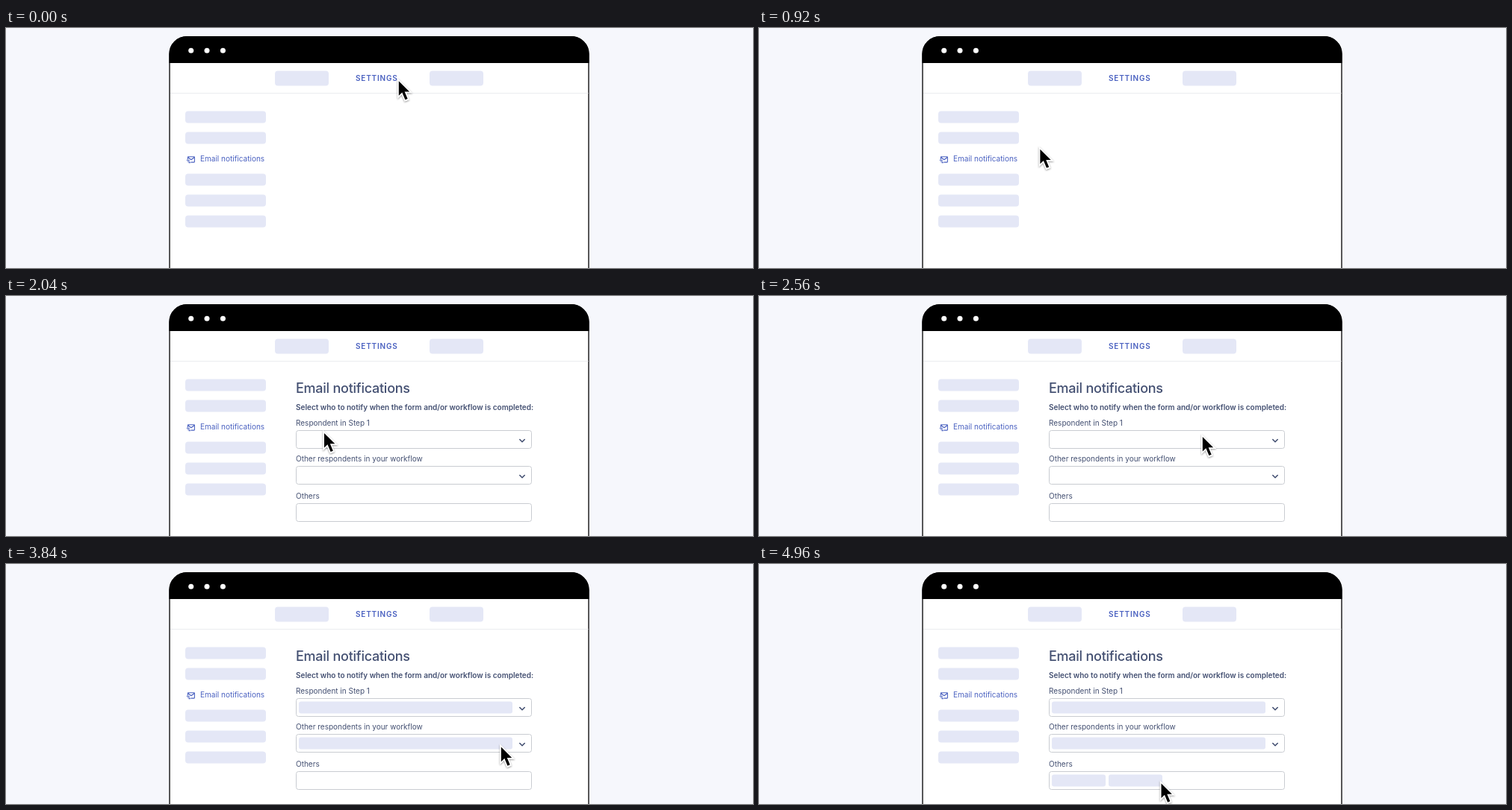
Animation of 1000x322 px, one loop 6040 ms. Source, as an HTML page:

```html
<!DOCTYPE html>
<html lang="en">
<head>
<meta charset="utf-8">
<title>Email notification settings</title>
<style>
  html, body { margin: 0; width: 100%; height: 100%; overflow: hidden; background: #f6f7fc; }
  svg { display: block; width: 100%; height: 100%; }
  text { font: 400 10px Inter, sans-serif; fill: #445072; }
  .blue { fill: #4a61c0; }
  .nav { font-weight: 600; letter-spacing: .8px; }
  .title { font-size: 18px; font-weight: 500; letter-spacing: -.25px; }
  .strong { font-weight: 600; }
  .pill { fill: #e4e7f6; }
  .field { fill: #fff; stroke: #c9ccd1; }
  .chevron { fill: none; stroke: #445072; stroke-width: 1.6; stroke-linecap: round; stroke-linejoin: round; }
  #cursor { filter: drop-shadow(0 1px 1.2px rgba(0, 0, 0, .4)); }
</style>
</head>
<body>
<svg viewBox="0 0 1000 322">
  <rect x="219" y="11.65" width="561" height="360" rx="23" fill="#fff" stroke="#000" stroke-width="1.3"/>
  <path d="M218.4 47V35a24 24 0 0 1 24-24h514.200a24 24 0 0 1 24 24v12z"/>
  <g fill="#fff">
    <circle cx="247.700" cy="30.300" r="3.5"/>
    <circle cx="269" cy="30.300" r="3.5"/>
    <circle cx="290.400" cy="30.300" r="3.5"/>
  </g>
  <path d="M220 87.500H779.500" stroke="#ebecef"/>
  <text class="nav blue" x="468" y="71.300">SETTINGS</text>
  <g id="bars"></g>
  <path class="blue" transform="translate(240.600 170) scale(.56)" d="M20 4H6c-1.100 0-2 .9-2 2v5h2V8l6.400 4.800a1 1 0 0 0 1.200 0L20 8v9h-8v2h8c1.100 0 2-.9 2-2V6c0-1.100-.9-2-2-2zm-7 6.750L6.670 6h12.660zM2 12h7v2H2zm2 3h6v2H4zm3 3h4v2H7z"/>
  <text class="blue" x="260" y="179.300">Email notifications</text>

  <g id="panel">
    <text class="title" x="388" y="130">Email notifications</text>
    <text class="strong" x="388" y="153">Select who to notify when the form and/or workflow is completed:</text>
    <text x="388" y="174.200">Respondent in Step 1</text>
    <text x="388" y="222.200">Other respondents in your workflow</text>
    <text x="388" y="272.200">Others</text>
    <g id="fields"></g>
    <path class="chevron" d="M687.800 192.500l3.200 3.200 3.200-3.200M687.800 240.500l3.200 3.200 3.200-3.200"/>
  </g>

  <g id="cursor">
    <g transform="scale(1.75) translate(-9.200 -7.300)">
      <path fill="#fff" d="M8.200 20.900v-16l11.600 11.600H13l-.4.1zM17.300 21.600l-3.600 1.500L9 12l3.700-1.500z"/>
      <path d="M9.200 7.300v11.200l3-2.900.4-.1h4.800z"/>
      <rect x="12.500" y="13.600" width="2" height="8" transform="matrix(.9221 -.3871 .3871 .9221 -5.7605 6.5909)"/>
    </g>
  </g>
</svg>
<script>
const LOOP = 6040, TICK = 40;
const $ = id => document.getElementById(id);

function box(parent, cls, x, y, width, height, rx) {
  const el = document.createElementNS("http://www.w3.org/2000/svg", "rect");
  const attrs = { class: cls, x, y, width, height, rx };
  for (const k in attrs) el.setAttribute(k, attrs[k]);
  return parent.appendChild(el);
}

for (const x of [360, 567]) box($("bars"), "pill", x, 57.5, 72, 20, 4);
for (const row of [0, 1, 3, 4, 5]) box($("bars"), "pill", 240, 111.5 + row * 28, 108, 16, 4);
for (const y of [180.5, 228.5, 278.5]) box($("fields"), "field", 388.5, y, 315, 24, 3);

const entry = (x, y, width) => box($("fields"), "pill", x, y, width, 16, 3);

// [time shown, element]
const reveals = [
  [1720, $("panel")],
  [2920, entry(392, 184.5, 286)],
  [3720, entry(392, 232.5, 286)],
  [4400, entry(392, 282.5, 72)],
  [4960, entry(468, 282.5, 72)]
];

// [time, x, y] of the pointer tip, linear between stops
const path = [
  [0, 525.8, 71.2],
  [480, 525.8, 71.2],
  [980, 356, 175.2],
  [1520, 348.5, 181.6],
  [1800, 348.5, 181.6],
  [2800, 671.3, 191.2],
  [3080, 671.3, 191.2],
  [3580, 671.3, 243.5],
  [3820, 671.3, 243.5],
  [4320, 459.5, 294.5],
  [4450, 459.5, 294.5],
  [4950, 538.5, 294.5],
  [LOOP, 538.5, 294.5]
];

function pointerAt(t) {
  const i = path.findIndex(p => p[0] > t);
  const [t0, x0, y0] = path[i - 1], [t1, x1, y1] = path[i];
  const k = (t - t0) / (t1 - t0);
  return [x0 + (x1 - x0) * k, y0 + (y1 - y0) * k];
}

function draw(now) {
  const t = Math.floor(now / TICK) * TICK % LOOP;
  for (const [at, el] of reveals) el.style.display = t >= at ? "" : "none";
  $("cursor").setAttribute("transform", `translate(${pointerAt(t)})`);
}

function loop() {
  draw(performance.now());
  requestAnimationFrame(loop);
}
loop();
</script>
</body>
</html>
```
